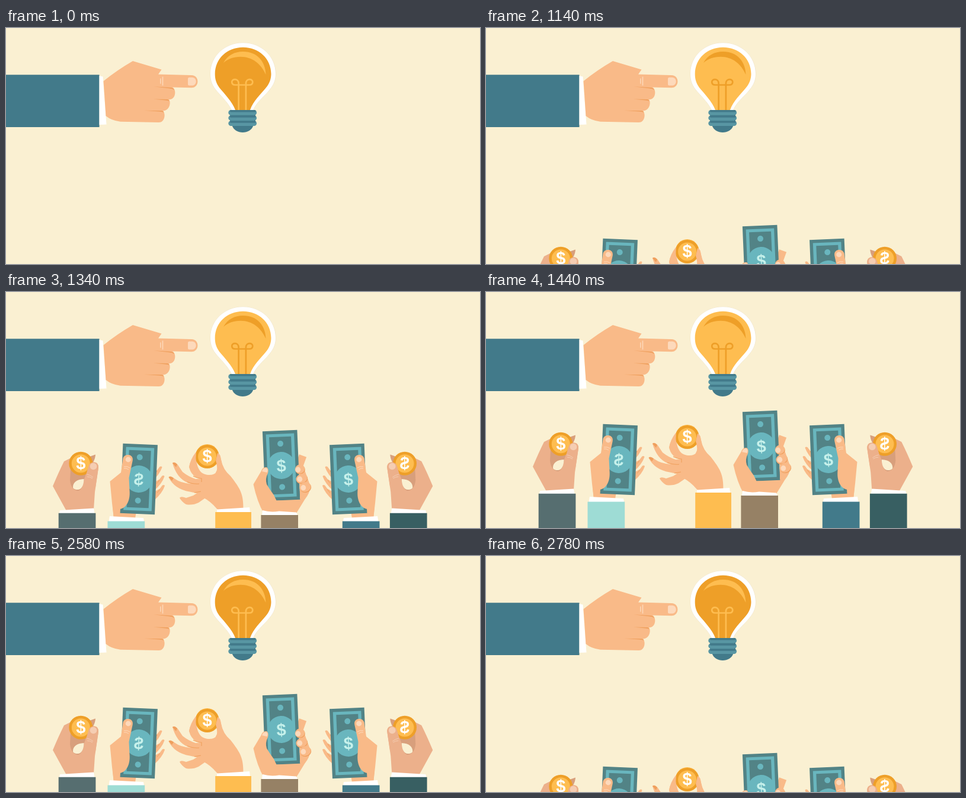
Animation of 800 by 400 pixels, one loop 2880 ms. Source, as an HTML page with a canvas:

```html
<!DOCTYPE html>
<html lang="en">
<head>
<meta charset="utf-8">
<title>Funding an idea</title>
<style>
html, body { margin: 0; width: 100%; height: 100%; overflow: hidden; background: #faf0d2; }
canvas { display: block; width: 800px; height: 400px; }
</style>
</head>
<body>
<canvas id="stage" width="800" height="400"></canvas>
<script>
const ctx = document.getElementById('stage').getContext('2d');
const LOOP = 2880;
const CREAM = '#faf0d2', WHITE = '#fff', TEAL = '#427a8a', BAND = '#5896a3';
const GOLD = '#febd50', AMBER = '#ee9f28';
const SKIN = '#f9ba88', SHADE = '#ef9f5c', NAIL = '#fdd9bb';
const TAN = '#ecb08b', TAN_SHADE = '#d89f7c', TAN_NAIL = '#f5cdb2';
const NOTE = '#528386', NOTE_LIGHT = '#69b6be', NOTE_SIGN = '#c6f1eb';

// Vertical offset of the raised hands; each step holds until the next.
const STEPS = [[0, null], [1140, 133], [1240, 66], [1340, 33], [1440, 0],
               [2580, 33], [2680, 66], [2780, 133]];

function fill(color, d) {
  ctx.fillStyle = color;
  ctx.fill(new Path2D(d));
}

function line(color, width, d) {
  ctx.strokeStyle = color;
  ctx.lineWidth = width;
  ctx.stroke(new Path2D(d));
}

function rect(color, x, y, w, h, r = 0) {
  ctx.fillStyle = color;
  ctx.beginPath();
  ctx.roundRect(x, y, w, h, r);
  ctx.fill();
}

function oval(color, x, y, rx, ry = rx, turn = 0) {
  ctx.fillStyle = color;
  ctx.beginPath();
  ctx.ellipse(x, y, rx, ry, turn, 0, Math.PI * 2);
  ctx.fill();
}

function dollar(color, x, y) {
  ctx.fillStyle = color;
  ctx.font = 'bold 29px "Liberation Sans", Arial, sans-serif';
  ctx.textAlign = 'center';
  ctx.fillText('$', x, y + 9.4);
}

function mirrored(sum, draw) {
  ctx.save();
  ctx.translate(sum, 0);
  ctx.scale(-1, 1);
  draw();
  ctx.restore();
}

function coin(x, y) {
  oval(AMBER, x, y, 20);
  oval(GOLD, x, y, 15.5);
  dollar(WHITE, x, y);
}

function banknote(x, y) {
  ctx.save();
  ctx.translate(x, y);
  ctx.rotate(-0.042);
  rect(NOTE, -29.3, -59, 58.6, 118);
  rect(NOTE_LIGHT, -23.8, -53.5, 47.6, 107);
  rect(NOTE, -18.5, -48.5, 37, 97);
  oval(NOTE_LIGHT, 0, 0, 23);
  oval(NOTE_LIGHT, 0, -37, 5);
  oval(NOTE_LIGHT, 0, 36.5, 5);
  dollar(NOTE_SIGN, 0, 1);
  ctx.restore();
}

function sleeve(color, x, y, w) {
  rect(color, x, y, w, 200);
}

function pointingArm() {
  rect(TEAL, 0, 79.3, 157.5, 88.7);
  fill(WHITE, 'M157.5 81 L163.5 82.5 L169.5 163.5 L157.5 164 Z');
  fill(SKIN, 'M164.5 90 Q188 71 214 56 L262.5 70.5 L257 78.5 L313 80 C327 80 327 101.3 313 101.3 ' +
    'L281 100.5 C288 104 287 121.5 275 121.3 C279 126 276 140.5 265 140.5 ' +
    'C270 146 268 160 258 160 L193 158.7 Q178 157 168.5 149 Z');
  fill(SHADE, 'M249 99.3 L279 101 Q283 102 284 105 Q280 102.5 275 102.3 Z');
  fill(SHADE, 'M249 120.6 L273 121 Q275 122 275.5 124 Q273 122.5 269 122.4 Z');
  fill(SHADE, 'M233 139.8 L263 140.3 Q266 141 266.5 143 Q263 141.6 258 141.5 Z');
  fill(NAIL, 'M309.5 83.8 L314 83.8 C323 84 323 97.5 314 97.6 L309.5 97.5 Q307 97.5 307 95 L307 86.5 Q307 83.8 309.5 83.8 Z');
  line(NAIL, 1.5, 'M260.8 85.5 V94.5 M264.5 82.5 V97.5');
}

function bulb(lit) {
  const glass = lit ? GOLD : AMBER, detail = lit ? AMBER : GOLD;
  const outer = 'M381 139 C376 128 366 118 357 108 C349 99 345 90 345 78 C345 48 369 25.3 400 25.3 ' +
    'C431 25.3 455 48 455 78 C455 90 450 99 442 108 C433 118 423 126 417 139 Z';
  line('#eee2c8', 1, outer);
  fill(WHITE, outer);
  fill(glass, 'M387 139 C382 125 369 112 360 101 C355 94 352.7 87 352.7 78 C352.7 52 373 32.7 400 32.7 ' +
    'C427 32.7 447.5 52 447.5 78 C447.5 87 444 95 439 101 C430 112 417 124 412 139 Z');
  fill(detail, 'M367 59 C374 46 386 40 400 40 C424 40 438 57 438.5 79 C430 60 416 49 396 48.7 C384 48.7 375 52 367 59 Z');
  line(detail, 2.7, 'M392.6 139 V94 C392.6 85 381.2 85.5 381.2 91.5 C381.2 94.8 383.5 96.5 387 96.5 ' +
    'H410.5 C414 96.5 416.3 94.8 416.3 91.5 C416.3 85.5 404.9 85 404.9 94 V139');
  fill(TEAL, 'M381.5 165 H417.5 C413 181 386 181 381.5 165 Z');
  rect(TEAL, 378, 139, 43, 26);
  for (let y = 139; y < 160; y += 9.1) {
    rect(BAND, 375.3, y, 47.8, 8.8, 4.4);
    rect(TEAL, 378, y, 43.5, 3.6, 1.5);
  }
}

function coinHand(color) {
  fill(TAN_SHADE, 'M104 258 L138 247 L151 242.5 Q151 248 147 256 L143 290 L125 308 L104 300 Z');
  fill(TAN, 'M102 338 L79 296 Q89 272 98 254 L110 248 L108 286 Q110 303 122 304 ' +
    'Q130 301 132 284 L139 264 C141 253 157 252 156 265 L150 306 L148 336 Z');
  fill(CREAM, 'M113 298 C113 290 119 284.5 131.5 284 C131.5 295 127 302.5 120.5 302 C116 302 113 300 113 298 Z');
  coin(126.3, 257.7);
  fill(TAN, 'M134 280 L139.5 262 C142 252.5 157 253 156 265 L151 298 L136 298 Z');
  oval(TAN_NAIL, 147.5, 262.5, 5.8);
  line(TAN_NAIL, 1, 'M136.5 276 Q142 277 147 281 M137 280 Q142 280 146 283');
  fill(WHITE, 'M91 337 L148 333.5 L149.5 342 L90 342 Z');
  sleeve(color, 88.7, 341.8, 62.7);
}

function noteHand(color) {
  for (const [x, y] of [[538, 262], [534, 277.5], [533.5, 293.5]]) {
    ctx.save();
    ctx.translate(x, y);
    fill(SKIN, 'M0.5 2 Q1 -0.5 4.5 1 L9 7 L18 12 L18 26 Q5 15 0.5 2 Z');
    line(SHADE, 0.9, 'M9 8 Q11 12 14 14');
    ctx.restore();
  }
  fill(SKIN, 'M582 338 L622 330 L620 351 L584 351 Z');
  banknote(577.8, 284);
  fill(SKIN, 'M588.3 253 C586 241 602 240 604.5 249 L608 273 L626.5 288 L623 325 L620 351 ' +
    'L610.5 351 L609.3 335 C598 332 592 320 593.5 303 L594.5 282 Z');
  oval(NAIL, 595.7, 251, 4.6, 4.4);
  line(NAIL, 1, 'M593 265 Q597 262 603 263 M595 268 Q599 265 603 266');
  fill(WHITE, 'M570 350 L627 347 L628.5 356 L569 356 Z');
  sleeve(color, 567.8, 355.5, 62.7);
}

function openHand() {
  fill(SKIN, 'M281 257 Q284 253.5 290 260 L298 272 Q308 280 320 284 L331 283 L331 298 L306 290 Q288 282 281 257 Z');
  fill(SKIN, 'M274.5 281 Q277 277 284 283 Q295 291 312 292 L330 290 L336 311 L310 305.5 Q284 301 274.5 281 Z');
  fill(SKIN, 'M293 316 Q295 312.5 304 316 L316 312 L330 303 L338 315 L325 324 Q315 329 304 327 Q297 323 293 316 Z');
  fill(SKIN, 'M320 239 Q311 251 309 264 Q312 276 321 281 L330 284 L326 312 Q340 318 350 328 L361 340 ' +
    'L400.5 336 C401 308 395 300 379 279 Q366 268 363 251 Q361 240 356 240 L340 260 Z');
  fill(CREAM, 'M321.5 254 C324 271 332 277 343 277 C355 277 359 270 355 258 Q340 274 321.5 254 Z');
  line(SHADE, 1.1, 'M316 279 Q324 283 330 283 L330 289 M318 307 L329 305 M306 289 Q317 293 326 292');
  fill(SHADE, 'M281 257 Q284 254 289 259 L287 264 Z');
  fill(SHADE, 'M274.5 281 Q277 278 283 282.5 L280 287 Z');
  oval(GOLD, 339.6, 245, 19.9);
  coin(339.6, 246);
  fill(SKIN, 'M321 239 Q311 251 309 264 L324 273 Q319 257 321 239 Z');
  fill(SKIN, 'M357 240 Q362 241 363 252 Q365 266 373 274 L354 273 Q359 266 354 253 Z');
  fill(WHITE, 'M356 335.5 L411 332 L412 341 L356 341 Z');
  sleeve(GOLD, 353.2, 340, 60.8);
}

function gripHand() {
  line(SKIN, 13, 'M494 264 L501 244.5');
  fill(SKIN, 'M448 312 L497 304 L514 296 Q513 308 504 319 L490 342 L434 342 L440 320 Z');
  banknote(464.6, 261);
  fill(SKIN, 'M430.5 271 Q433 263 440 264 Q444 267 442 274 Q437 284 440 293 Q446 303 452 311 ' +
    'L456.5 320.5 L470 320.5 L466 342 L435 342 Q424 323 417.5 293 Z');
  fill(NAIL, 'M432 271 Q434 264.5 440 265.5 Q443 268 440.5 273 Z');
  fill(SKIN, 'M496 262 L503 266 L513 294 L507 312 L496 318 Z');
  const tips = [[496, 267, 8.2, 7.5], [499, 283, 9.8, 7.6], [505, 297.5, 9.8, 8.2]];
  for (const [x, y, rx, ry] of tips) {
    oval(SHADE, x + 0.6, y + 1.2, rx, ry, -0.3);
    oval(SKIN, x, y, rx, ry, -0.3);
    oval(NAIL, x - 3.2, y + 1.2, 4.4, 4.6);
  }
  fill(WHITE, 'M433 337 Q446 341 461 338.5 L490 340.5 L492 346 L432 346 Z');
  sleeve('#968165', 430.4, 345, 62.6);
}

function crowd(offset) {
  ctx.save();
  ctx.translate(0, offset);
  coinHand('#566e70');
  mirrored(802, () => noteHand('#9edcd5'));
  openHand();
  gripHand();
  noteHand(TEAL);
  mirrored(799.3, () => coinHand('#385f62'));
  ctx.restore();
}

function render(now) {
  const t = now % LOOP;
  const offset = STEPS.findLast(([start]) => t >= start)[1];
  rect(CREAM, 0, 0, 800, 400);
  pointingArm();
  bulb(t >= 1000 && t < 2440);
  if (offset !== null) crowd(offset);
}

let begin;
function tick(now) {
  begin ??= now;
  render(Math.max(0, now - begin));
  requestAnimationFrame(tick);
}
render(0);
requestAnimationFrame(tick);
</script>
</body>
</html>
```
